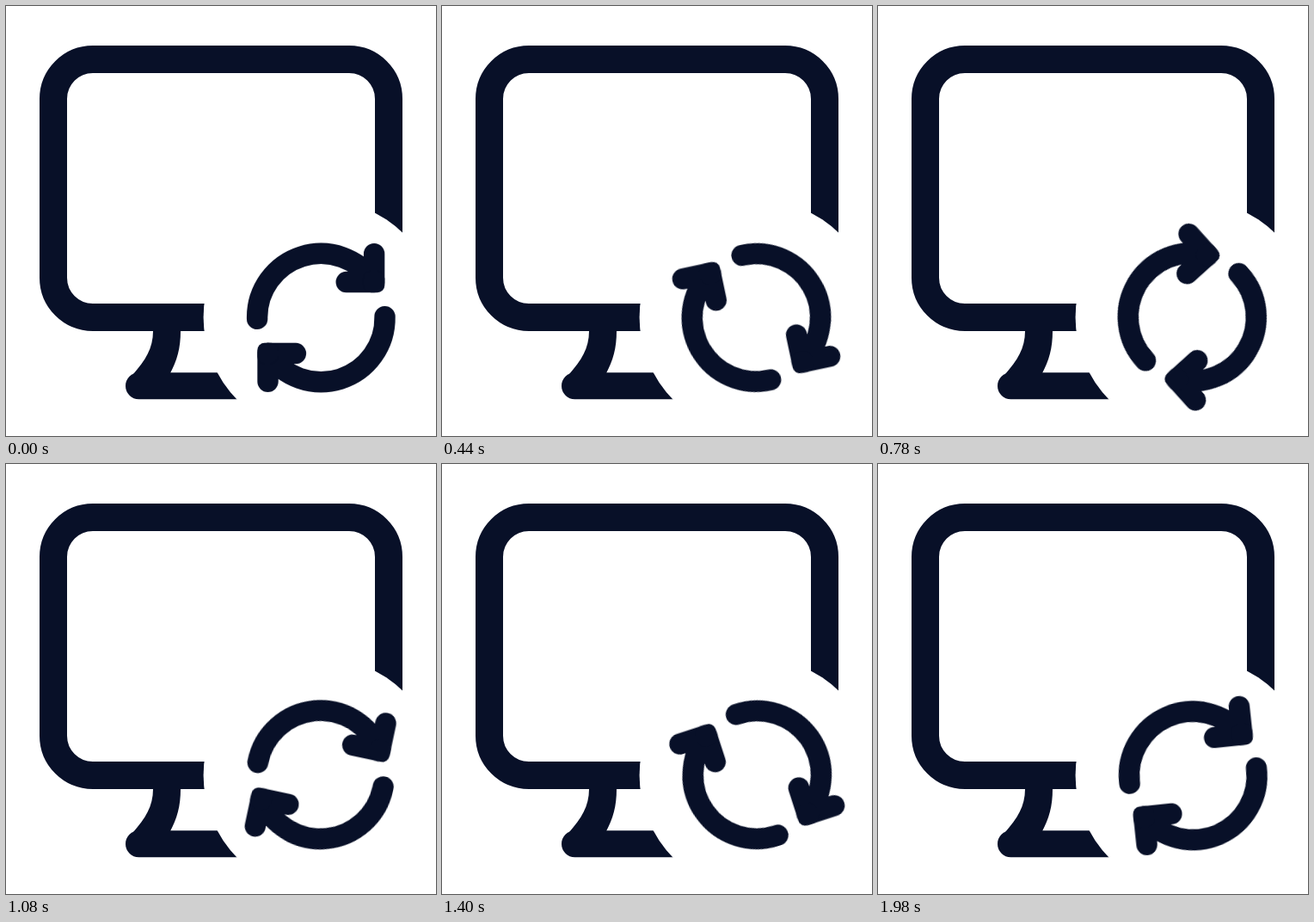
An HTML page that plays this animation: 500x500 px, repeating every 2000 ms.

```html
<!DOCTYPE html>
<html lang="en">
<head>
<meta charset="utf-8">
<title>Monitor sync icon</title>
<style>
  html, body { margin: 0; width: 100%; height: 100%; overflow: hidden; background: #fff; }
  svg { display: block; width: 100%; height: 100%; }
  .ink { fill: #081028; }
  .line { fill: none; stroke: #081028; stroke-linecap: round; stroke-linejoin: round; }
  /* 60 discrete poses per second; the tiny delay keeps sampling off step edges */
  .spin { animation: spin 2s steps(120, end) -1ms infinite; }
  @keyframes spin { to { transform: rotate(360deg); } }
</style>
</head>
<body>
<svg viewBox="0 0 500 500">
  <defs>
    <g id="arrow">
      <path class="line" stroke-width="24.4" d="M-74.2 1.3A74.2 74.2 0 0 1 61.8 -41.5M61.8 -74.3V-41.5H29.4"/>
      <rect class="ink" x="49.6" y="-53.7" width="24.4" height="24.4" rx="8.5"/>
    </g>
  </defs>

  <!-- monitor and stand -->
  <rect class="line" x="55" y="62" width="390" height="300" rx="46" stroke-width="32"/>
  <path class="ink" d="M171 370V378C171 398 162 412 148 428H190.500C199 412 203 398 203 378V370Z"/>
  <path class="line" stroke-width="31" d="M154.500 441.700H290"/>

  <!-- cut-out with the turning arrows, which sit slightly off their pivot -->
  <circle cx="366.3" cy="362" r="136.7" fill="#fff"/>
  <g transform="translate(365.9 361.9)">
    <g class="spin">
      <g transform="translate(.35 .55)">
        <use href="#arrow"/>
        <use href="#arrow" transform="rotate(180)"/>
      </g>
    </g>
  </g>
</svg>
</body>
</html>
```
